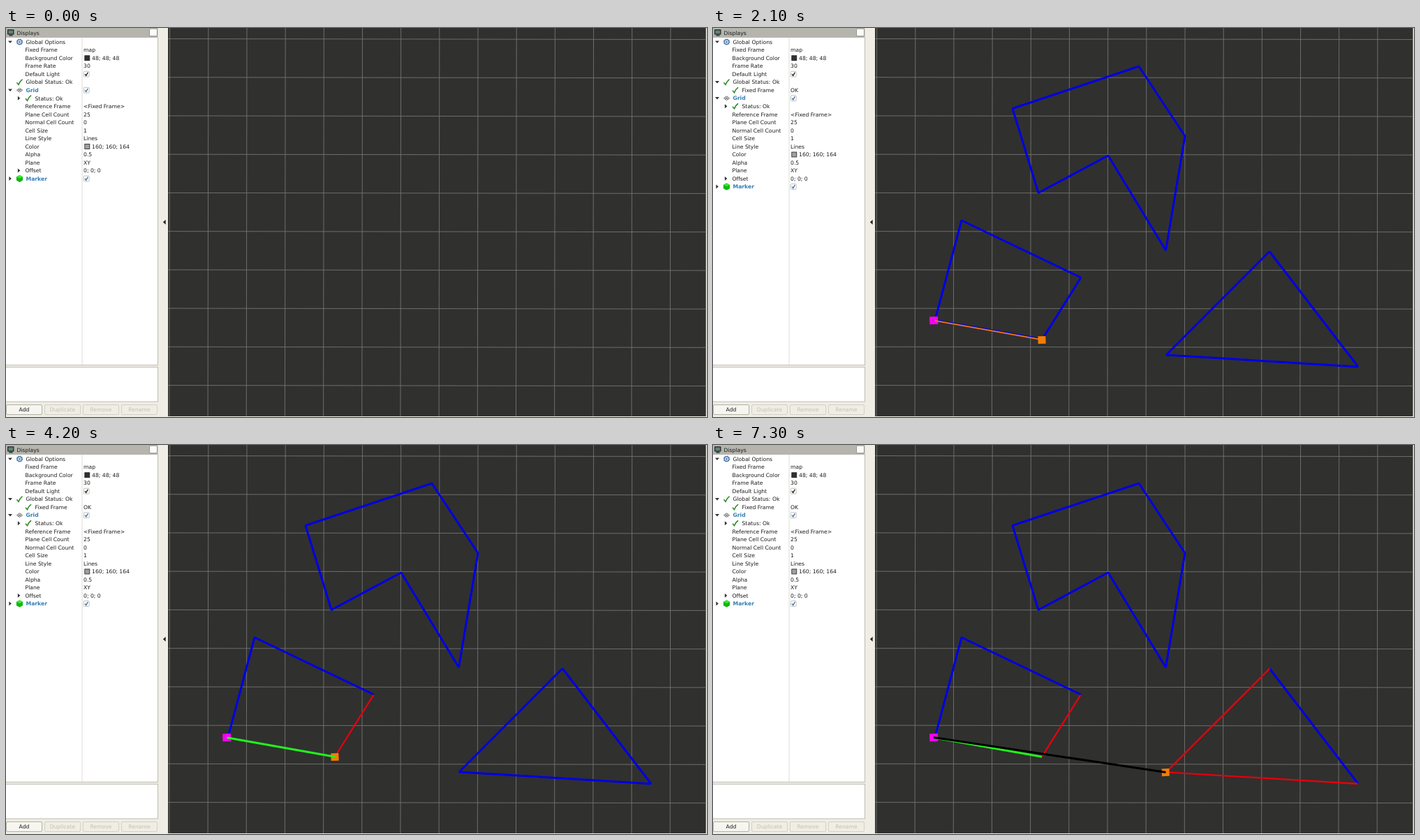
Animation of 1004x558 px, one loop 8 s. Source, as an HTML page:

```html
<!DOCTYPE html>
<html lang="en">
<head>
<meta charset="utf-8">
<style>
html, body { margin: 0; width: 100%; height: 100%; overflow: hidden; background: #efede4; }
svg { display: block; width: 1004px; height: 558px; }
text { font: 7.68px "DejaVu Sans", sans-serif; fill: #1c1c1c; text-rendering: geometricPrecision; }
.head { font-weight: bold; fill: #337eb3; }
.off { fill: #c2c0b6; }
</style>
</head>
<body>
<svg id="stage" viewBox="0 0 1004 558"></svg>
<script>
const LOOP = 8000, ROW = 11.53, SHIFT_AT = 300;
const BLUE = '#0000e2', RED = '#e6000c', GREEN = '#22f41c', ORANGE = '#f57c05', MAGENTA = '#f502f0';

const rect = (x, y, w, h, fill, extra = '') =>
  `<rect x="${x}" y="${y}" width="${w}" height="${h}" fill="${fill}" ${extra}/>`;
const path = (d, stroke, width, extra = '') =>
  `<path d="${d}" fill="none" stroke="${stroke}" stroke-width="${width}" ${extra}/>`;
const text = (x, y, s, cls = '', extra = '') =>
  `<text x="${x}" y="${y + 2.8}" class="${cls}" ${extra}>${s.replace(/</g, '&lt;')}</text>`;
const during = (from, to, content) => `<g data-from="${from}" data-to="${to}">${content}</g>`;

// Tree widgets
const tick = (x, y) => path(`M${x - 4} ${y + .5}l2.5 3q2 -5 5.5 -7.5`, '#2f8a2c', 1.6);
const arrow = (x, y, open) =>
  `<path d="${open ? `M${x - 3} ${y - 1.6}h6l-3 3.4z` : `M${x - 1.6} ${y - 3}v6l3.4 -3z`}" fill="#333"/>`;
const checkbox = (y, color) =>
  rect(111.3, y - 3.9, 7.8, 7.8, '#fff', 'stroke="#b5b3ab" stroke-width=".8" rx="1"') +
  path(`M113 ${y}l1.7 2.2l2.6 -4.6`, color, 1.3);
const swatch = (y, color) => rect(112.8, y - 3.4, 7, 7, color, 'stroke="#222" stroke-width=".8"');
const icons = {
  gear: y => `<circle cx="19.5" cy="${y}" r="3.4" fill="#d5e0ec" stroke="#4c78ab" stroke-width="1.4"/>` +
    `<circle cx="19.5" cy="${y}" r="4.2" fill="none" stroke="#4c78ab" stroke-dasharray="1.6 1.7"/>` +
    `<circle cx="19.5" cy="${y}" r="1.2" fill="#4c78ab"/>`,
  grid: y => path(`M15.5 ${y}l4 -2.8l4 2.8l-4 2.8zM17.5 ${y - 1.4}l4 2.8M21.5 ${y - 1.4}l-4 2.8`, '#555', .9),
  cube: y => `<path d="M19.5 ${y - 5}l4.6 2.4v5.2l-4.6 2.6l-4.6 -2.6v-5.2z" fill="#12b812"/>` +
    `<path d="M19.5 ${y - 5}l4.6 2.4l-4.6 2.4l-4.6 -2.4z" fill="#3fe53a"/>`,
  tick: y => tick(19.5, y),
};

function row(index, { label, value = '', icon, cls, open, shut, sub, check, color }) {
  const y = 20 + index * ROW;
  let out = text(sub ? 41.5 : icon ? 28.5 : 27.5, y, label, cls);
  if (icon) out += icons[icon](y);
  if (sub) out += tick(32, y);
  if (open) out += arrow(6, y, true);
  if (shut) out += arrow(shut, y, false);
  if (check) out += checkbox(y, check);
  if (color) out += swatch(y, color);
  return out + text(color ? 123 : 111, y, value);
}

const upper = [
  { label: 'Global Options', icon: 'gear', open: true },
  { label: 'Fixed Frame', value: 'map' },
  { label: 'Background Color', value: '48; 48; 48', color: '#303030' },
  { label: 'Frame Rate', value: '30' },
  { label: 'Default Light', check: '#111' },
  { label: 'Global Status: Ok', icon: 'tick' },
];
const lower = [
  { label: 'Grid', icon: 'grid', cls: 'head', open: true, check: '#3a6ea5' },
  { label: 'Status: Ok', sub: true, shut: 18.5 },
  { label: 'Reference Frame', value: '<Fixed Frame>' },
  { label: 'Plane Cell Count', value: '25' },
  { label: 'Normal Cell Count', value: '0' },
  { label: 'Cell Size', value: '1' },
  { label: 'Line Style', value: 'Lines' },
  { label: 'Color', value: '160; 160; 164', color: '#a0a0a4' },
  { label: 'Alpha', value: '0.5' },
  { label: 'Plane', value: 'XY' },
  { label: 'Offset', value: '0; 0; 0', shut: 18.5 },
  { label: 'Marker', icon: 'cube', cls: 'head', shut: 6, check: '#3a6ea5' },
];

const button = (label, i) =>
  rect(.5 + i * 55, 540.5, 51, 14, i ? '#efede4' : '#f6f5ef', `stroke="${i ? '#d3d1c7' : '#b3b1a8'}" rx="1.5"`) +
  text(26 + i * 55, 547.6, label, i ? 'off' : '', 'text-anchor="middle"');

const panel =
  rect(0, 0, 217.5, 13.5, '#b5b4ad') +
  rect(2, 2, 9.5, 7.5, '#262b2b', 'rx="1"') + rect(3.3, 3.3, 6.9, 4.9, '#5d8577') + rect(4.5, 9.5, 5, 2, '#3a3a3a') +
  text(15.5, 6.8, 'Displays') +
  rect(205.5, 1, 11, 10.6, '#fbfbf9', 'stroke="#8d8c86" stroke-width=".9" rx="1.5"') +
  rect(-1, 13.5, 218.5, 470, '#fff', 'stroke="#bfbdb4"') +
  path('M109 14V483', '#dddcd8', 1) +
  rect(-1, 486.5, 218.5, 49.5, '#fff', 'stroke="#bfbdb4"') +
  ['Add', 'Duplicate', 'Remove', 'Rename'].map(button).join('') +
  '<path d="M228.7 275v7l-3.8 -3.5z" fill="#222"/>' +
  upper.map((r, i) => row(i, r)).join('') +
  during(SHIFT_AT, LOOP, arrow(6, 20 + 5 * ROW, true) + row(6, { label: 'Fixed Frame', value: 'OK', sub: true })) +
  `<g id="lower">${lower.map((r, i) => row(i + 6, r)).join('')}</g>`;

// 3D view
let gridLines = '';
for (let i = 0; i < 14; i++) gridLines += `M${234.3 + i * 55.17} -5V565`;
for (let i = 0; i < 10; i++) gridLines += `M225 ${16 + i * 55.23}H1010`;

const block = (x, y, w, h, color) => rect(x - w / 2, y - h / 2, w, h, color, `transform="rotate(-2 ${x} ${y})"`);
const thin = d => path(d, ORANGE, 1.7);

const view =
  '<clipPath id="clip"><rect x="232" width="770.5" height="557"/></clipPath><g clip-path="url(#clip)">' +
  rect(232, 0, 771, 557, '#30302f') +
  path(gridLines, '#747473', .9, 'transform="rotate(.075 617 278)"') +
  during(100, LOOP,
    path('M610 55L676 155L648.5 319L566 183L466 236.5L429 115.5Z', BLUE, 3, 'stroke-linejoin="bevel"') +
    path('M318 419L356 276L527 358M797 320.5L924 486', BLUE, 3, 'stroke-linejoin="bevel"')) +
  during(100, 3200, path('M318 419.5L471.5 446.5', BLUE, 3)) +
  during(100, 4200, path('M527 358L471.5 446.5', BLUE, 3)) +
  during(100, 7300, path('M797 320.5L649 469L924 486', BLUE, 3, 'stroke-linejoin="bevel"')) +
  during(4200, LOOP, path('M526.5 358.5L471.5 446.5', RED, 2.3)) +
  during(7300, LOOP, path('M797.5 320.5L649 469.3L923.5 486', RED, 2.3)) +
  during(100, LOOP, block(316.2, 419.5, 12, 11, MAGENTA)) +
  during(2100, 5200, block(471, 447.5, 11, 10.8, ORANGE)) +
  during(5200, LOOP, block(648.2, 469.6, 10.8, 10.8, ORANGE)) +
  during(2100, 3200, thin('M318 419.8L471 447.2')) +
  during(5200, 6200, thin('M318 419.8L648.5 469.5')) +
  during(3200, LOOP, path('M316.5 419.8L471 447.3', GREEN, 3)) +
  during(6200, LOOP, path('M316 419.5L648.5 469.5', '#000', 3)) +
  '</g>';

const stage = document.getElementById('stage');
stage.innerHTML = panel + view;
const lowerRows = document.getElementById('lower');
const timed = [...stage.querySelectorAll('[data-from]')];

function draw(now) {
  const t = now % LOOP;
  for (const el of timed) {
    const shown = t >= +el.dataset.from && t < +el.dataset.to;
    el.setAttribute('visibility', shown ? 'visible' : 'hidden');
  }
  lowerRows.setAttribute('transform', `translate(0 ${t >= SHIFT_AT ? ROW : 0})`);
}

const start = performance.now();
function tickFrame() {
  draw(performance.now() - start);
  requestAnimationFrame(tickFrame);
}
tickFrame();
</script>
</body>
</html>
```
